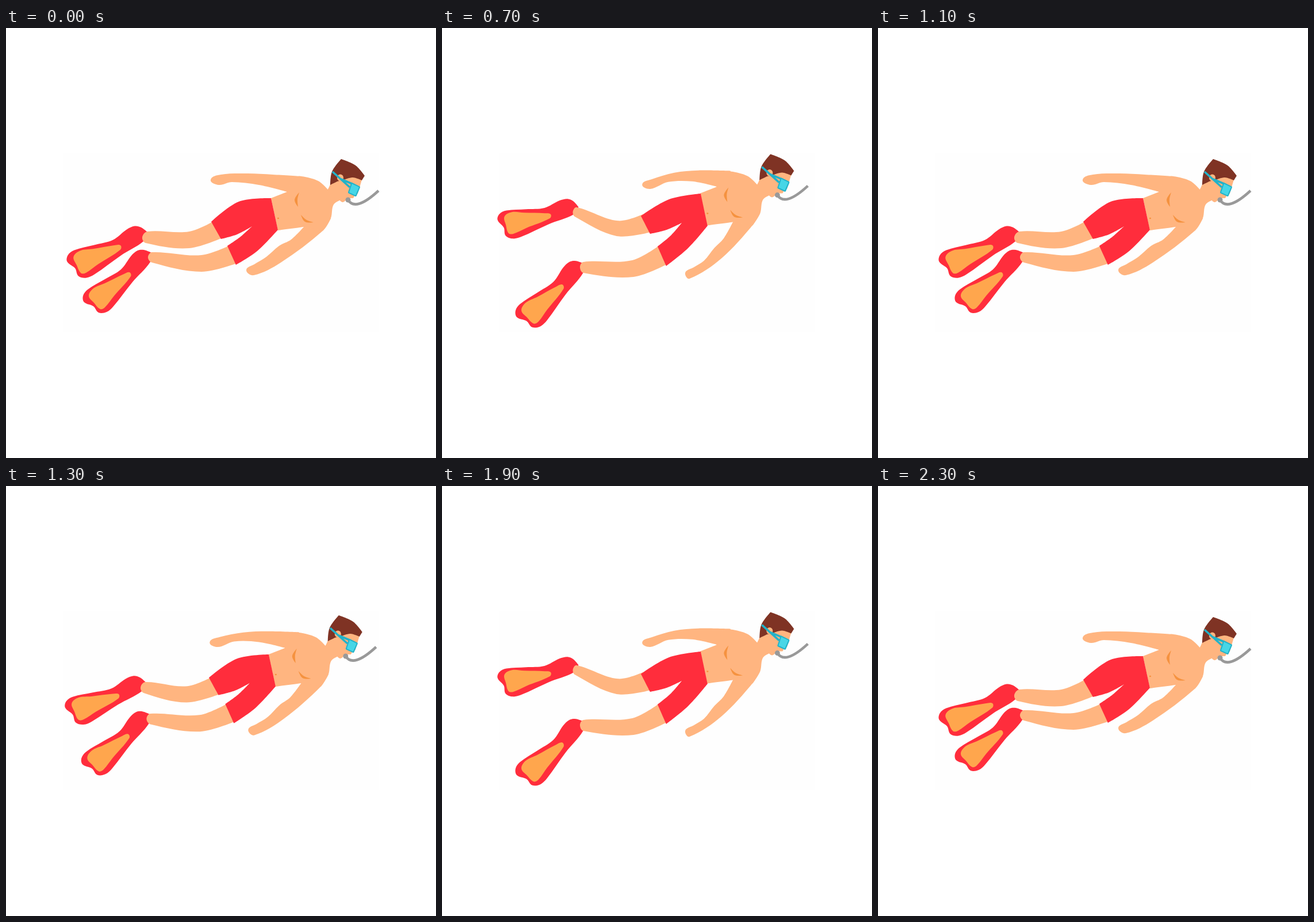
Recreate the animation shown at these times as an HTML page with a canvas. Size 748 by 748 pixels, loop 2400 ms.

```html
<!DOCTYPE html>
<html lang="en">
<head>
<meta charset="utf-8">
<title>Snorkeler</title>
<style>
html, body { margin: 0; width: 100%; height: 100%; overflow: hidden; background: #fff; }
canvas { display: block; }
</style>
</head>
<body>
<canvas id="stage" width="748" height="748"></canvas>
<script>
const ctx = document.getElementById('stage').getContext('2d');
const SKIN = '#ffb580', RED = '#ff2d3c', ORANGE = '#ffa64d', HAIR = '#7f3324',
  LENS = '#47d6e6', FRAME = '#22b2c9', GREY = '#999', SHADE = '#f5923f';

// Outlines are x, y pairs; in a mask, c is a corner and s a smooth point.
const fin = {
  mask: 'cssssssssssssss',
  pts: [253, 391, 240, 386, 229, 387, 218, 396, 200, 420, 172, 437, 142, 455, 134, 466,
    136, 477, 152, 484, 161, 495, 175, 494, 187, 484, 220, 442, 251, 407]
};
const blade = {
  mask: 'ssssssssss',
  pts: [205, 428, 215, 425, 217, 432, 188, 466, 172, 486, 164, 489, 153, 478, 144, 466, 152, 453, 172, 444]
};
// Ankle and tip of each fin: closed, open, late. The outline above fits finBase.
const finBase = [252, 399, 145, 485];
const backFin = [[243, 363, 113, 417], [235, 325, 102, 360], [233, 318, 101, 345]];
const frontFin = [finBase, [245, 416, 138, 506], [246, 418, 140, 511]];

// Moving limbs: closed and open pose.
const backLeg = {
  mask: 'csssssc',
  pts: [367, 333, 319, 354, 246, 354, 237, 364, 243, 374, 319, 383, 383, 362],
  open: [355, 324, 308, 338, 236, 318, 229, 326, 233, 335, 306, 365, 370, 355]
};
const frontLeg = {
  mask: 'csssssc',
  pts: [392, 377, 340, 395, 254, 390, 247, 399, 254, 408, 340, 424, 405, 408],
  open: [381, 376, 331, 404, 246, 407, 240, 416, 246, 426, 333, 433, 395, 409]
};
const shorts = {
  mask: 'csccscsccsc',
  pts: [461, 296, 405, 302, 357, 337, 374, 367, 402, 359, 428, 345, 408, 363, 385, 379, 400, 412, 437, 388, 473, 351],
  open: [450, 288, 395, 298, 346, 327, 362, 358, 391, 351, 417, 339, 398, 361, 375, 380, 390, 414, 428, 383, 462, 344]
};
const backArm = {
  mask: 'cssssssscc',
  pts: [489, 285, 440, 273, 393, 268, 370, 273, 356, 264, 374, 255, 420, 253, 464, 255, 514, 258, 515, 285],
  open: [491, 284, 452, 277, 415, 283, 377, 301, 363, 294, 379, 285, 412, 266, 452, 257, 513, 256, 517, 284]
};
const frontArm = {
  mask: 'csssssssscc',
  pts: [565, 331, 552, 352, 478, 408, 431, 430, 418, 421, 432, 411, 453, 398, 475, 379, 496, 368, 518, 346, 530, 325],
  open: [565, 329, 553, 350, 503, 409, 445, 448, 439, 437, 454, 428, 471, 417, 488, 394, 503, 376, 518, 345, 530, 324]
};

// Parts that move with the body.
const trunk = {
  mask: 'cccsscccssccc',
  pts: [461, 296, 489, 285, 500, 259, 514, 258, 543, 266, 560, 281, 566, 272, 585, 298,
    570, 307, 565, 331, 552, 352, 518, 346, 473, 352]
};
const face = {
  mask: 'cccsscccccc',
  pts: [566, 268, 560, 281, 570, 303, 577, 298, 586, 303, 594, 296, 604, 296, 607, 291, 612, 288, 619, 264, 590, 252]
};
const hair = {
  mask: 'csccscccs',
  pts: [583, 228, 608, 239, 624, 257, 619, 265, 603, 260, 588, 264, 576, 267, 564, 273, 567, 250]
};
const chest = { mask: 'cscs', pts: [510, 286, 502, 299, 508, 311, 507, 298] };
const rib = { mask: 'cscs', pts: [513, 325, 520, 337, 535, 338, 523, 334] };
const lens = { mask: 'cccc', pts: [602, 271, 614, 277, 608, 291, 597, 286] };

// Amount of each part's move per step; the steps run there and back.
const moves = {
  body: [0, .36, .7, 1, 1, .96],
  backLeg: [0, .36, .7, 1, 1.17, 1.27],
  backArm: [0, .36, .7, 1, .55, .3],
  frontArm: [0, .36, .7, 1, .8, .65]
};

const lerp = (a, b, t) => a.map((v, i) => v + (b[i] - v) * t);

function outline(pts, mask) {
  const n = mask.length, path = new Path2D();
  const at = i => [pts[(i + n) % n * 2], pts[(i + n) % n * 2 + 1]];
  const handle = (i, len) => {
    const p = at(i % n);
    if (mask[i % n] === 'c') return p;
    const a = at(i % n - 1), b = at(i % n + 1);
    const k = len / Math.hypot(b[0] - a[0], b[1] - a[1]);
    return [p[0] + (b[0] - a[0]) * k, p[1] + (b[1] - a[1]) * k];
  };
  path.moveTo(...at(0));
  for (let i = 0; i < n; i++) {
    const p = at(i), q = at(i + 1);
    const len = Math.hypot(q[0] - p[0], q[1] - p[1]) / 3;
    path.bezierCurveTo(...handle(i, len), ...handle(i + 1, -len), ...q);
  }
  path.closePath();
  return path;
}

function fill(shape, color, t = 0) {
  const pts = shape.open ? lerp(shape.pts, shape.open, t) : shape.pts;
  ctx.fillStyle = color;
  ctx.fill(outline(pts, shape.mask));
}
function stroke(path, color, width) {
  ctx.strokeStyle = color;
  ctx.lineWidth = width;
  ctx.stroke(path);
}
function oval(x, y, rx, ry, color) {
  ctx.fillStyle = color;
  ctx.beginPath();
  ctx.ellipse(x, y, rx, ry, 0, 0, Math.PI * 2);
  ctx.fill();
}

function drawFin(poses, step) {
  const [closed, open, late] = poses;
  const [x, y, tx, ty] = step < 4
    ? lerp(closed, open, moves.body[step])
    : lerp(open, late, step === 4 ? 1 : 1.6);
  const [bx, by, btx, bty] = finBase;
  const size = Math.hypot(tx - x, ty - y) / Math.hypot(btx - bx, bty - by);
  ctx.save();
  ctx.translate(x, y);
  ctx.rotate(Math.atan2(ty - y, tx - x) - Math.atan2(bty - by, btx - bx));
  ctx.scale(size, size);
  ctx.translate(-bx, -by);
  fill(fin, RED);
  fill(blade, ORANGE);
  ctx.restore();
}

function drawHead() {
  fill(face, SKIN);
  fill(hair, HAIR);
  oval(581.5, 260.5, 5.5, 6, SKIN);
  stroke(new Path2D('M595 299Q608 320 648 283'), GREY, 4.6);
  oval(595, 299, 4.5, 4.5, GREY);
  stroke(new Path2D('M568 250L598 277M583 263L602 271'), FRAME, 3.6);
  stroke(outline(lens.pts, lens.mask), FRAME, 4);
  fill(lens, LENS);
}

function draw(step) {
  const body = moves.body[step];
  ctx.fillStyle = '#fff';
  ctx.fillRect(0, 0, 748, 748);
  ctx.fillStyle = '#fefefe';
  ctx.fillRect(99, 218, 549, 311);
  drawFin(backFin, step);
  drawFin(frontFin, step);
  fill(backLeg, SKIN, moves.backLeg[step]);
  fill(frontLeg, SKIN, body);
  ctx.save();
  ctx.translate(-11.6 * body, -8.4 * body);
  fill(backArm, SKIN, moves.backArm[step]);
  fill(frontArm, SKIN, moves.frontArm[step]);
  fill(trunk, SKIN);
  fill(chest, SHADE);
  fill(rib, SHADE);
  oval(473.5, 331, 1.6, 1.3, SHADE);
  drawHead();
  ctx.restore();
  fill(shorts, RED, body);
}

ctx.lineJoin = 'round';
const start = performance.now();
let shown = -1;
function tick() {
  const n = Math.floor((performance.now() - start) / 100) % 12;
  const step = Math.min(n, 11 - n);
  if (step !== shown) draw(shown = step);
  requestAnimationFrame(tick);
}
tick();
</script>
</body>
</html>
```
